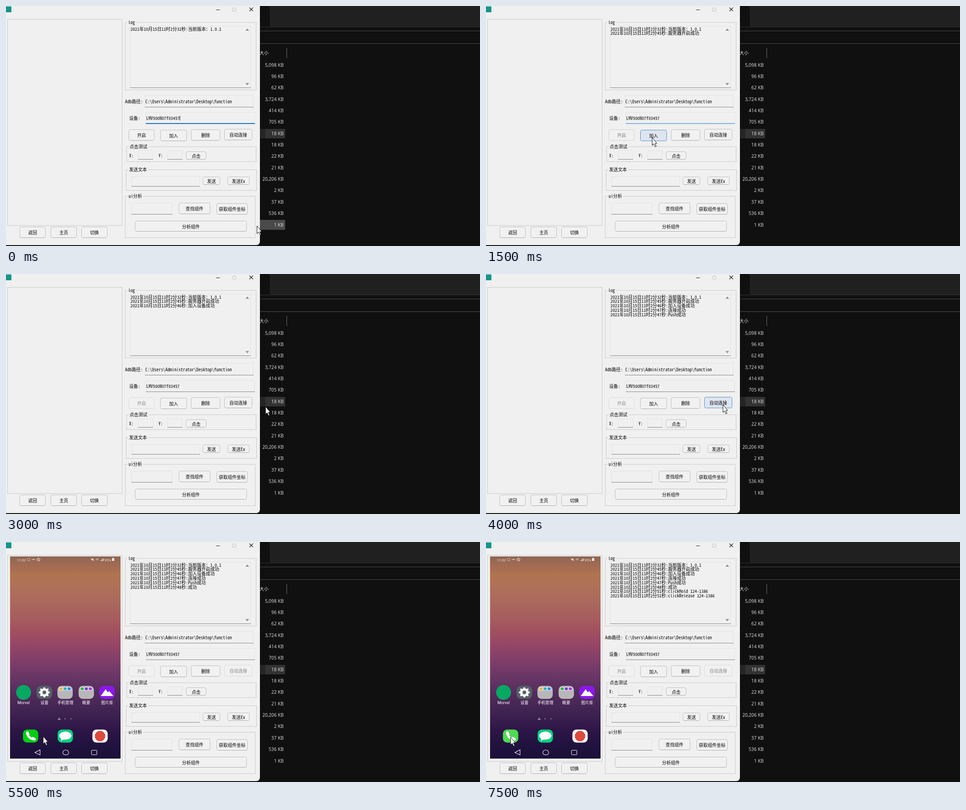
Write an HTML page with a canvas that moves like this. It is 1051 px wide and 533 px high and loops after 8000 ms.

```html
<!DOCTYPE html>
<html lang="zh-CN">
<head>
<meta charset="utf-8">
<title>Device control</title>
<style>
html, body { margin: 0; width: 100%; height: 100%; overflow: hidden; background: #101010; }
canvas { display: block; }
</style>
</head>
<body>
<canvas id="stage" width="1051" height="533"></canvas>
<script>
const ctx = document.getElementById('stage').getContext('2d');
const LOOP = 8000, STEP = 500;
const MONO = '9.83px "Noto Sans Mono CJK SC", "Noto Sans CJK SC", "Noto Sans CJK", monospace';
const LIST = '10.2px "Open Sans", "Noto Sans", sans-serif';
const CJK = '"Noto Sans CJK SC", "Noto Sans CJK", sans-serif';
const FACE = '#f0f0f0', LINE = '#c9c9c9', BLUE = '#1170c4';

// Cursor tip for each half second
const cursorPath = [
  [556, 488], [195, 447], [331, 280], [368, 292],
  [442, 291], [442, 291], [575, 294], [525, 290],
  [525, 290], [525, 290], [292, 425], [82, 431],
  [71, 437], [120, 437], [54, 433], [54, 433]
];

// [time shown, second of the clock, message]
const logLines = [
  [0, 32, '当前版本：1.0.1'],
  [1500, 45, '服务器开启成功'],
  [3000, 46, '加入设备成功'],
  [4000, 47, '连接成功'],
  [4000, 47, 'Push成功'],
  [4500, 48, '成功'],
  [7500, 51, 'clickHold 124-1386'],
  [7500, 51, 'clickRelease 124-1386']
];

const sizes = ['5,098', '96', '62', '3,724', '414', '705', '18', '18',
  '22', '21', '20,206', '2', '37', '536', '1'];

function box(x, y, w, h, fill) {
  ctx.fillStyle = fill;
  ctx.fillRect(x, y, w, h);
}

function text(s, x, cy, color = '#000', font = MONO, align = 'left') {
  ctx.font = font;
  ctx.textAlign = align;
  ctx.fillStyle = color;
  ctx.fillText(s, x, cy + 3.6);
}

function round(x, y, w, h, r, fill, stroke) {
  ctx.beginPath();
  ctx.roundRect(x, y, w, h, r);
  if (fill) { ctx.fillStyle = fill; ctx.fill(); }
  if (stroke) { ctx.strokeStyle = stroke; ctx.lineWidth = 1; ctx.stroke(); }
}

function disc(x, y, r, fill) {
  ctx.beginPath();
  ctx.arc(x, y, r, 0, 7);
  ctx.fillStyle = fill;
  ctx.fill();
}

function shape(points, fill, stroke, width = 1) {
  ctx.beginPath();
  points.forEach(([x, y]) => ctx.lineTo(x, y));
  ctx.closePath();
  if (fill) { ctx.fillStyle = fill; ctx.fill(); }
  if (stroke) { ctx.strokeStyle = stroke; ctx.lineWidth = width; ctx.stroke(); }
}

function path(points, color, width = 1) {
  ctx.beginPath();
  points.forEach(([x, y], i) => i % 2 ? ctx.lineTo(x, y) : ctx.moveTo(x, y));
  ctx.strokeStyle = color;
  ctx.lineWidth = width;
  ctx.stroke();
}

function drawFileList(t) {
  box(0, 0, 1051, 533, '#101010');
  ctx.beginPath();
  ctx.moveTo(583, 0);
  ctx.quadraticCurveTo(585, 4, 585, 12);
  ctx.lineTo(585, 47);
  ctx.lineTo(1051, 47);
  ctx.lineTo(1051, 0);
  ctx.fillStyle = '#202020';
  ctx.fill();
  box(562, 46, 489, 1, '#303030');
  box(562, 55, 489, 1, '#484848');
  box(562, 83, 489, 1, '#505050');
  box(622, 93, 1, 22, '#707070');
  text('大小', 562, 104, '#dedede', '10px ' + CJK);
  box(562, 273, 57, 21, '#333');
  box(562, 273, 13, 21, '#252525');
  if (t < 500) box(562, 475, 57, 22, '#4a4a4a');
  sizes.forEach((s, i) => text(s + ' KB', 615.5, 131 + i * 25.35, '#dedede', LIST, 'right'));
}

function group(title, x, y, r, b, tx) {
  ctx.strokeStyle = LINE;
  ctx.lineWidth = 1;
  ctx.strokeRect(x + .5, y + .5, r - x - 1, b - y - 1);
  ctx.font = MONO;
  ctx.textAlign = 'left';
  box(tx - 2, y - 2, ctx.measureText(title).width + 4, 5, FACE);
  text(title, tx, y);
}

function field(x, y, r, b) {
  ctx.strokeStyle = '#e3e3e3';
  ctx.lineWidth = 1;
  ctx.strokeRect(x + .5, y + .5, r - x - 1, b - y - 1);
  box(x, b - 1, r - x, 1, '#818181');
}

function button(label, x, y, r, b, look = {}) {
  const { fill = '#f1f1f1', edge = '#bdbdbd', color = '#000' } = look;
  round(x + .5, y + .5, r - x - 1, b - y - 1, 3, fill, edge);
  if (!look.edge) box(x + 3, b - 1, r - x - 6, 1, '#aaa');
  text(label, (x + r) / 2, (y + b) / 2 + 1, color, MONO, 'center');
}

const off = { fill: '#f1f1f1', edge: '#dadada', color: '#888' };
const fading = { fill: '#f1f1f1', edge: '#cfcfcf', color: '#777' };
const hover = { fill: '#e0e4f0', edge: '#4c95c9' };
const pressed = { fill: '#cee0f3', edge: '#1478c8' };

function drawButtons(t) {
  const startLook = t < 1000 ? {} : t < 1500 ? { edge: '#77a3bd' } : t < 2000 ? fading : off;
  const addLook = t < 1500 || t >= 2500 ? {} : t < 2000 ? hover : pressed;
  const deleteLook = t >= 2500 && t < 3000 ? hover : {};
  const autoLook = t < 3500 ? {} : t < 4500 ? hover : off;
  button('开启', 272, 274, 329, 299, startLook);
  button('加入', 342, 275, 401, 300, addLook);
  button('删除', 410, 274, 475, 299, deleteLook);
  button('自动连接', 484, 273, 546, 298, autoLook);
  button('点击', 399, 323, 444, 341);
  button('发送', 436, 379, 475, 397);
  button('发送Ex', 491, 379, 540, 397);
  button('查找组件', 383, 437, 453, 462);
  button('获取组件坐标', 467, 438, 536, 463);
  button('分析组件', 286, 477, 534, 501);
  button('返回', 30, 490, 88, 515);
  button('主页', 99, 490, 157, 515);
  button('切换', 167, 490, 225, 515);
}

function drawWindow(t) {
  round(-10, -10, 573, 541, 8, FACE);
  box(0, 1, 12, 13, '#16958c');
  path([[466, 8.5], [474, 8.5]], '#111');
  round(502.5, 4.5, 7, 7, 1, null, '#bdbdbd');
  path([[539.7, 3.5], [547.7, 11.5], [547.7, 3.5], [539.7, 11.5]], '#111', 1.1);
  ctx.strokeStyle = LINE;
  ctx.lineWidth = 1;
  ctx.strokeRect(3.5, 29.5, 254, 458);

  group('log', 264, 36, 555, 187, 271);
  group('点击测试', 267, 312, 555, 346, 274);
  group('发送文本', 266, 363, 556, 410, 273);
  group('ui分析', 264, 422, 553, 515, 272);

  field(275, 44, 543, 182);
  shape([[531, 55], [539, 55], [535, 50]], '#929292');
  shape([[531, 171], [539, 171], [535, 176]], '#929292');
  logLines.forEach(([at, sec, msg], i) => {
    if (t >= at) text(`2021年10月15日11时2分${sec}秒:${msg}`, 276, 51 + i * 9.8);
  });

  text('Adb路径:', 264, 212);
  field(308, 198, 549, 225);
  text('C:\\Users\\Administrator\\Desktop\\function', 309, 212);
  text('设备:', 273, 249);
  field(310, 236, 552, 262);
  text('LMV500N07f03457', 311, 249);
  if (t < 2000) box(310, 260, 242, 2, t < 1500 ? BLUE : '#83afd6');
  if (t < 500 || (t >= 1000 && t < 1500)) box(385, 244, 1, 10, '#000');

  text('X:', 273, 332);
  text('Y:', 338, 332);
  field(293, 321, 326, 341);
  field(358, 321, 391, 341);
  field(278, 378, 430, 401);
  field(278, 437, 369, 463);
  drawButtons(t);
}

function tile(x, y, fill) {
  round(x - 17, y - 14.5, 34, 29, 9, fill);
}

function handset(x, y) {
  ctx.save();
  ctx.translate(x, y);
  ctx.strokeStyle = '#fff';
  ctx.lineCap = 'round';
  ctx.lineWidth = 5;
  ctx.beginPath();
  ctx.moveTo(-7.5, -6);
  ctx.quadraticCurveTo(-5, 5, 7, 7);
  ctx.stroke();
  path([[-7, -7.5], [-5.5, -3.5], [5, 5], [8.5, 7]], '#fff', 6);
  ctx.restore();
}

function gear(x, y) {
  const pts = [];
  for (let i = 0; i < 32; i++) {
    const a = (i - .5) * Math.PI / 16, r = i % 4 < 2 ? 11.3 : 8.8;
    pts.push([x + r * 1.1 * Math.cos(a), y + r * Math.sin(a)]);
  }
  shape(pts, '#f2f2f2');
  disc(x, y, 4, '#566068');
}

function folder(x, y, colors) {
  tile(x, y, '#b9b6b9');
  colors.forEach((c, i) => {
    round(x - 13.5 + i * 9, y - 12, 9, 8, 2.5, '#f0f0f0');
    round(x - 12.5 + i * 9, y - 11, 7, 6, 2, c);
  });
}

function drawStatus() {
  const small = '8px Roboto, "Noto Sans", sans-serif', ink = '#f0e6e0';
  text('11:02', 24, 39, ink, small);
  round(47.5, 36.5, 6, 5, 1, null, '#d8c8bd');
  path([[57, 39], [65, 39], [60, 36.5], [63, 39]], ink);
  ctx.beginPath();
  ctx.arc(72, 39, 3.2, 0, 7);
  ctx.stroke();
  path([[69.5, 37], [74.5, 41]], ink);
  shape([[189, 38], [191, 38], [194, 36], [194, 42], [191, 40], [189, 40]], ink);
  path([[188, 36], [195, 42]], ink);
  ctx.beginPath();
  ctx.arc(202, 42, 5, -2.3, -.84);
  ctx.stroke();
  ctx.beginPath();
  ctx.arc(202, 42, 2.5, -2.3, -.84);
  ctx.stroke();
  for (let i = 0; i < 4; i++) box(209 + i * 2, 41 - i * 1.5, 1.3, 1 + i * 1.5, ink);
  text('95%', 218, 39, ink, small);
  box(235, 36, 5, 6, ink);
  box(236.5, 35, 2, 1, ink);
}

function drawPhone(t) {
  const wall = ctx.createLinearGradient(0, 32, 0, 481);
  [[0, '#8e6654'], [.05, '#a46c53'], [.09, '#b07350'], [.16, '#af7059'], [.24, '#a9675d'],
   [.32, '#a65a5e'], [.38, '#a04e60'], [.44, '#944666'], [.5, '#843f69'], [.56, '#733a68'],
   [.62, '#623363'], [.69, '#502b59'], [.78, '#3d2250'], [.86, '#2d1647'], [.93, '#21123f'],
   [1, '#1b103a']
  ].forEach(([p, c]) => wall.addColorStop(p, c));
  box(9, 32, 245, 449, wall);
  drawStatus();

  disc(39, 334, 16.5, '#07a862');
  tile(85, 334, '#566068');
  gear(85, 334);
  folder(131, 334, ['#efb13a', '#22b9cf', '#338bdc']);
  folder(178, 334, ['#1fbd3c', '#7c3ad8', '#9440e0']);
  tile(224, 334, '#8b16ee');
  shape([[210, 342], [221, 327], [226, 334], [229, 331], [238, 342]], '#fff');
  const labels = ['Morvel', '设置', '手机管理', '概要', '图片库'];
  labels.forEach((s, i) => text(s, 39 + i * 46.3, 356, '#fff', `8.8px Roboto, ${CJK}`, 'center'));

  shape([[116, 392.5], [118, 390.5], [120, 392.5], [120, 394.5], [116, 394.5]], null, '#e6e0ea');
  disc(131, 392.5, 1.6, '#7c6a8a');
  disc(144, 392.5, 1.6, '#7c6a8a');

  tile(54.5, 431, t >= 7500 ? '#4edb50' : '#00cd12');
  handset(54.5, 431);
  tile(131.5, 431, '#08ce80');
  ctx.beginPath();
  ctx.ellipse(131.5, 430, 13.5, 9, 0, 0, 7);
  ctx.fillStyle = '#fff';
  ctx.fill();
  shape([[122, 434], [122, 442], [130, 437]], '#fff');
  tile(208.5, 431, '#f4f4f4');
  disc(208.5, 431, 11.5, '#dc4a3c');

  shape([[64, 467.5], [75.5, 461.5], [75.5, 473]], null, '#fff', 1.1);
  ctx.beginPath();
  ctx.ellipse(132.5, 467.5, 6.5, 5.5, 0, 0, 7);
  ctx.stroke();
  round(189.5, 462.5, 12, 10, 1, null, '#fff');
}

function drawCursor([x, y]) {
  const arrow = [[0, 0], [0, 17], [3.6, 13.6], [6.5, 20], [9, 19], [6.2, 12.7], [10.5, 12.5]];
  shape(arrow.map(([a, b]) => [x + a + .5, y + b + .5]), '#fff', '#111');
}

function frame() {
  const t = performance.now() % LOOP;
  drawFileList(t);
  drawWindow(t);
  if (t >= 4500) drawPhone(t);
  drawCursor(cursorPath[Math.floor(t / STEP)]);
  requestAnimationFrame(frame);
}
frame();
</script>
</body>
</html>
```
